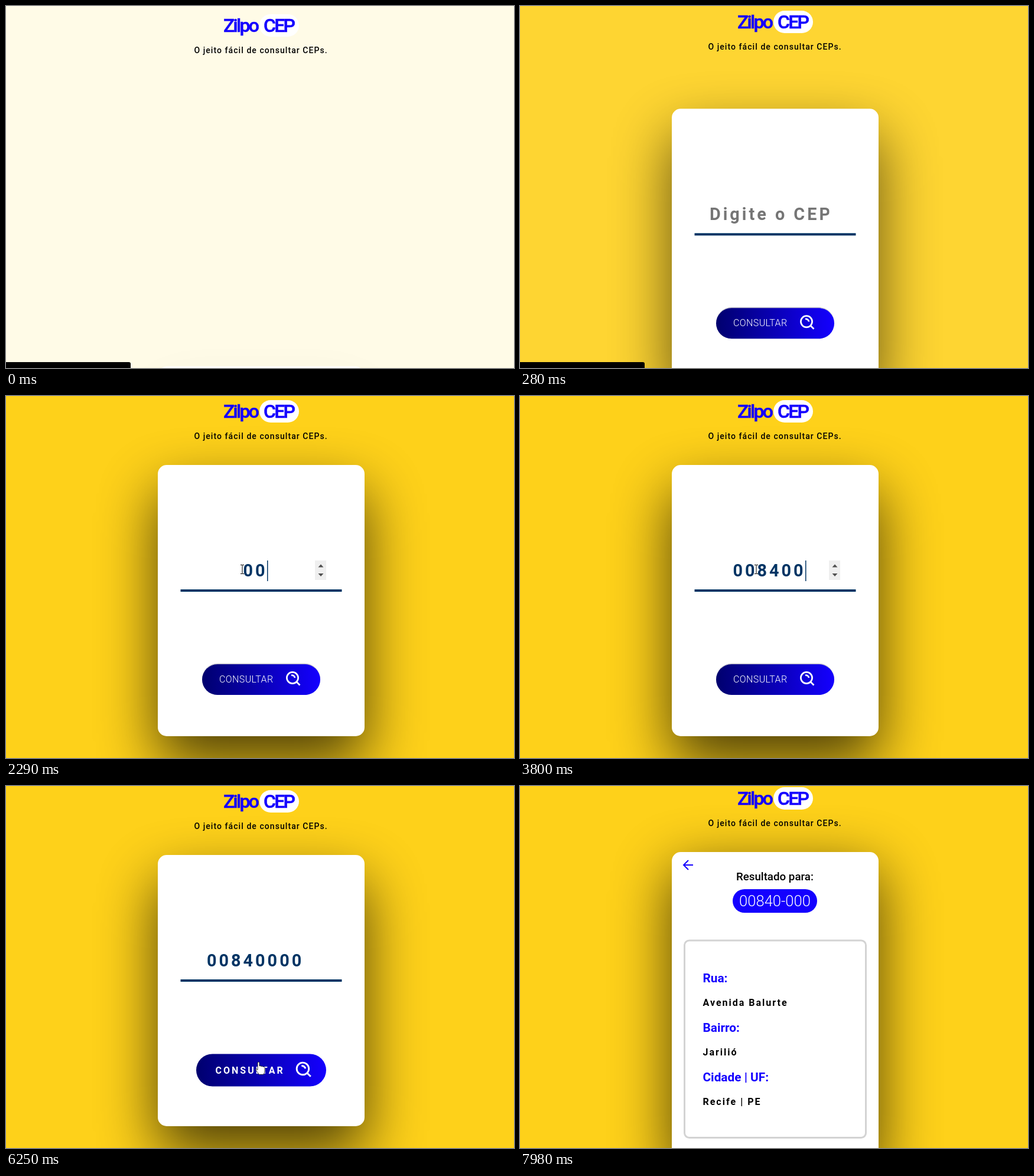
Animation, 860 px wide and 614 px high, one loop 8000 ms. Source, as an HTML page:

```html
<!DOCTYPE html>
<html lang="pt-BR">
<head>
<meta charset="utf-8">
<title>Zilpo CEP</title>
<style>
  html, body { margin: 0; height: 100%; overflow: hidden; background: #fff; }
  svg { display: block; width: 860px; height: 614px; font-family: Roboto, sans-serif; }
  text { white-space: pre; }
  .logo { font: 500 32px Roboto, sans-serif; letter-spacing: -2.7px; fill: #1400ff; stroke: #1400ff; stroke-width: .5px; }
  .tag { font-size: 14px; font-weight: 500; letter-spacing: 1.05px; }
  .field { font-size: 28.8px; font-weight: 700; letter-spacing: 4px; fill: #003464; }
  .hint { fill: #757575; }
  .label { font-size: 20.8px; font-weight: 600; fill: #1400ff; }
  .value { font-size: 16px; font-weight: 700; letter-spacing: 2px; }
  .shadow { fill: #000; opacity: .7; filter: blur(50px); }
</style>
</head>
<body>
<svg viewBox="0 0 860 614">
  <defs>
    <linearGradient id="blue">
      <stop stop-color="#00006e"/><stop offset="1" stop-color="#1400ff"/>
    </linearGradient>
    <clipPath id="inner"><rect x="318" y="270" width="205.500" height="50"/></clipPath>
  </defs>

  <rect id="back" width="860" height="614" fill="#fed11a"/>

  <g id="form">
    <rect id="shade" class="shadow" x="257" y="162" width="350" height="460" rx="15"/>
    <rect x="257" y="117" width="350" height="460" rx="15" fill="#fff"/>
    <g clip-path="url(#inner)">
      <text id="hint" class="field hint" x="321" y="306">Digite o CEP</text>
    </g>
    <text id="digits" class="field" y="306"></text>
    <rect id="caret" y="279" width="1.500" height="35" fill="#003464"/>
    <g id="spin">
      <rect x="523" y="279" width="19" height="33" fill="#efefef"/>
      <path d="M528.500 290.500l4.500-5 4.500 5zM528.500 301l4.500 5 4.500-5z" fill="#505050"/>
    </g>
    <rect x="295.500" y="328" width="273" height="4" fill="#003464"/>
    <rect id="rim" x="332" y="453.500" width="200" height="53.500" rx="26.500" fill="#c4c4cc"/>
    <rect id="button" fill="url(#blue)"/>
    <text id="caption" font-size="16" fill="#fff">CONSULTAR</text>
    <g id="lens" fill="none" stroke="#fff" stroke-width="2.700">
      <circle cx="-1" cy="-1" r="9.600"/>
      <path d="M5.800 5.800L11.500 11.500M-3 -5.300a5 5 0 0 1 6 4.300"/>
    </g>
  </g>

  <g id="result">
    <rect class="shadow" x="257" y="147" width="350" height="530" rx="15"/>
    <rect x="257" y="117" width="350" height="530" rx="15" fill="#fff"/>
    <path d="M293 139H278M285 131l-8 8 8 8" fill="none" stroke="#1400ff" stroke-width="2"/>
    <text x="431.500" y="165" text-anchor="middle" font-size="18.720" font-weight="500">Resultado para:</text>
    <rect x="360" y="180" width="143" height="40" rx="20" fill="#1400ff"/>
    <text x="431.500" y="209" text-anchor="middle" font-size="25.600" font-weight="300" fill="#fff">00840-000</text>
    <rect x="278.500" y="267" width="307" height="334.500" rx="8" fill="none" stroke="#d3d3d3" stroke-width="3"/>
    <text class="label" x="309.500" y="338">Rua:</text>
    <text class="value" x="309.500" y="378">Avenida Balurte</text>
    <text class="label" x="309.500" y="422">Bairro:</text>
    <text class="value" x="309.500" y="462">Jarilió</text>
    <text class="label" x="309.500" y="506">Cidade | UF:</text>
    <text class="value" x="309.500" y="546">Recife | PE</text>
  </g>

  <g id="header">
    <rect x="429" y="7" width="67" height="38" rx="19" fill="#fff"/>
    <text class="logo" x="368" y="37">Zilpo</text>
    <text class="logo" x="436" y="37">CEP</text>
    <text class="tag" x="318.500" y="73">O jeito fácil de consultar CEPs.</text>
  </g>

  <path id="status" d="M0 604h208a3 3 0 0 1 3 3v7H0z"/>

  <g id="mouse" stroke="#000" fill="#fff">
    <path id="arrow" d="M.5 .5v15.500l3.700-3.300 2.600 6 2.700-1.200-2.600-5.700h5z"/>
    <path id="beam" d="M-3 -7.500h2.500l.5 .5 .5-.5H3M0 -7V7M-3 7.500h2.500l.5-.5 .5 .5H3" fill="none"/>
    <path id="hand" stroke-width=".8" d="M-2 1q2-2 3 0v6q2-1 3 .5 2-1 3 .8 2-.8 3 1v6q0 3-2 6H0Q-2 17-5 14q-1-2 1-2l2 1.500z"/>
  </g>
</svg>
<script>
const $ = id => document.getElementById(id);
const set = (id, attrs) => { for (const k in attrs) $(id).setAttribute(k, attrs[k]); };
const show = (id, on) => { $(id).style.display = on ? '' : 'none'; };
const ramp = (t, a, b) => Math.min(1, Math.max(0, (t - a) / (b - a)));
const mix = (a, b, k) => a + (b - a) * k;
const smooth = k => k * k * (3 - 2 * k);

// CSS "ease": cubic-bezier(.25, .1, .25, 1)
function ease(x) {
  let lo = 0, hi = 1;
  const curve = (s, a, b) => 3 * s * (1 - s) ** 2 * a + 3 * s * s * (1 - s) * b + s ** 3;
  for (let i = 0; i < 24; i++) {
    const mid = (lo + hi) / 2;
    if (curve(mid, .25, .25) < x) lo = mid; else hi = mid;
  }
  return curve(lo, .1, 1);
}

const LOOP = 8000, TICK = 70, CODE = '00840000', PITCH = 20.5, RISE = 550;
const keys = [2030, 2290, 2550, 2880, 3340, 3800, 4130, 4460];
const bursts = [0, 880, 4990, 6380, 7060];

// Motion advances in ticks counted from the start of each burst.
function tick(t) {
  const start = bursts.filter(b => b <= t).pop();
  return start + Math.floor((t - start) / TICK) * TICK;
}

function pointer(t) {
  if (t < 4990) {
    const k = 1 - (1 - ramp(t, 880, 1300)) ** 2;
    return [mix(27, 400, k), mix(12, 294, k)];
  }
  if (t < 6990) {
    const k = smooth(ramp(t, 4920, 5760));
    return [mix(400, 428, k), mix(294, 468, k)];
  }
  const k = ramp(t, 6990, 7340);
  return [mix(428, 830, k), mix(468, 343, k)];
}

function drawForm(t, m, overField) {
  const n = keys.filter(k => k <= t).length;
  show('hint', !n);
  $('digits').textContent = CODE.slice(0, n);
  set('digits', { x: 422 - n * PITCH / 2 });

  const focus = n ? keys[n - 1] : 1370;
  set('caret', { x: 421.5 + n * PITCH / 2 });
  show('caret', t >= 1370 && t < 5830 && (t - focus) % 1060 < 530);
  show('spin', overField);

  const k = smooth(ramp(m, 5480, 5800));
  set('rim', { opacity: 1 - k });
  set('button', { x: 332 - 10 * k, y: 455 - k / 2, width: 200 + 20 * k, height: 52 + 3 * k, rx: 26 + 1.5 * k });
  set('caption', { x: mix(361, 354.5, k), y: mix(485.5, 488, k) });
  $('caption').style.letterSpacing = mix(.4, 3, k) + 'px';
  $('caption').style.fontWeight = Math.round(mix(3, 7, k)) * 100;
  set('lens', { transform: `translate(${mix(486, 503.5, k)} ${mix(479, 480.5, k)}) scale(${1 + .07 * k})` });
}

function draw(t) {
  const m = tick(t), done = t >= 6380;
  const intro = ease(ramp(m, -57, 490));
  const reveal = m >= 6730 ? 1 : ease(ramp(m, 6266, 6813));
  const scroll = t >= 7980 ? -5 : 0;

  const [x, y] = pointer(m);
  const overField = t >= 880 && y > 272 && y < 332 && x > 296 && !done;
  const overButton = y >= 455 && !done;

  set('back', { opacity: intro });
  set('shade', { 'fill-opacity': intro });
  set('form', { transform: `translate(0 ${RISE * (1 - intro)})` });
  set('header', { transform: `translate(0 ${Math.round(8 * (1 - intro)) + scroll})` });
  set('result', { transform: `translate(0 ${Math.round(RISE * (1 - reveal)) + scroll})` });
  show('form', !done);
  show('result', done);
  show('status', t < 490);
  if (!done) drawForm(t, m, overField);

  set('mouse', { transform: `translate(${x} ${y})` });
  show('mouse', t >= 880 && t < 7410);
  show('beam', overField);
  show('hand', overButton);
  show('arrow', !overField && !overButton);
}

function loop() {
  draw(performance.now() % LOOP);
  requestAnimationFrame(loop);
}
loop();
</script>
</body>
</html>
```
